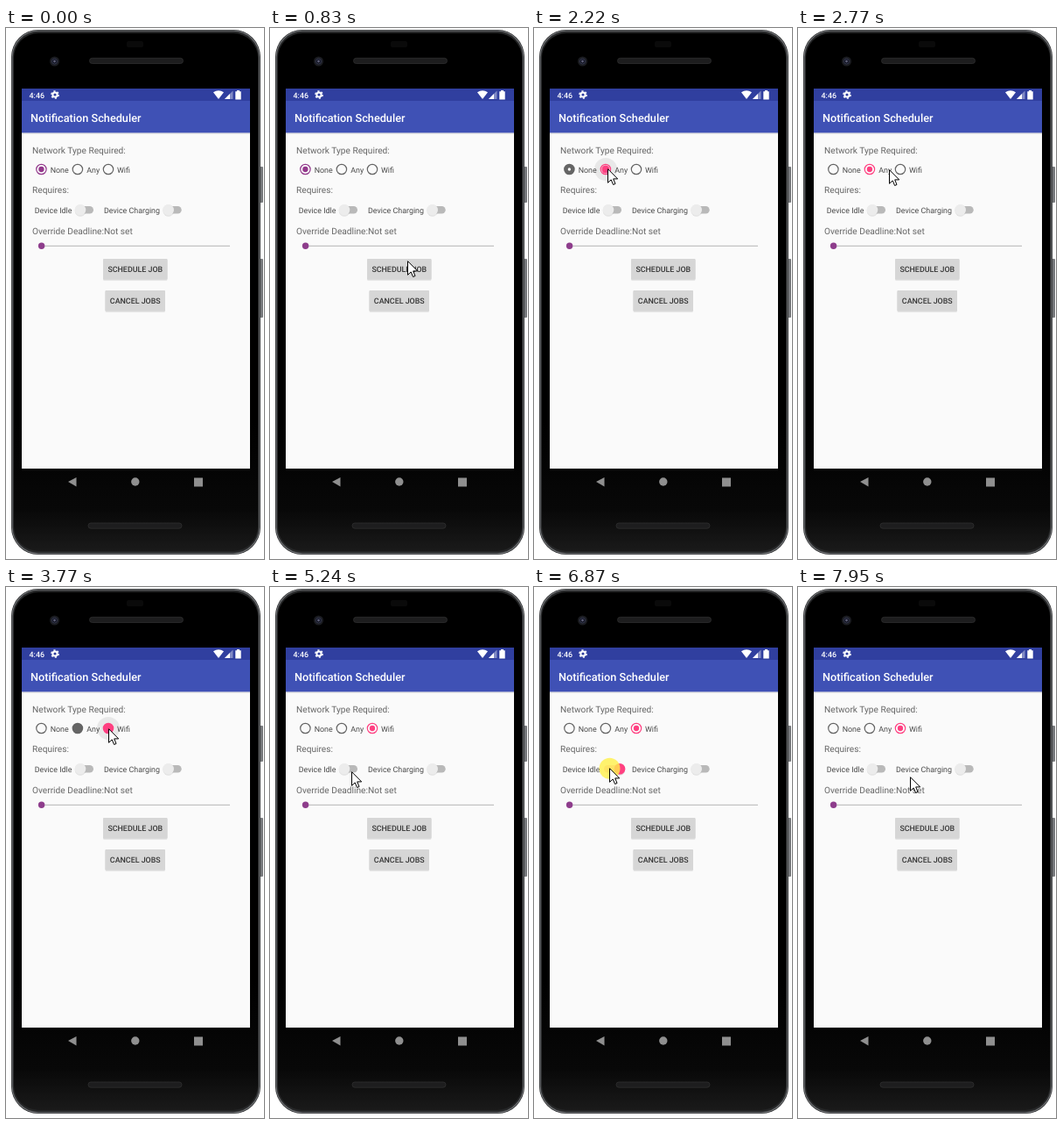
Write an HTML page that moves like this. It is 295 by 605 pixels and loops after 8000 ms.

```html
<!DOCTYPE html>
<html lang="en">
<head>
<meta charset="utf-8">
<title>Notification Scheduler</title>
<style>
  html, body { margin: 0; width: 100%; height: 100%; overflow: hidden; background: #fff; }
  svg { display: block; width: 295px; height: 605px; font: 8.89px Roboto, sans-serif; text-rendering: geometricPrecision; }
  .label { font-size: 10.16px; fill: #666; }
  .small { fill: #4a4a4a; }
  .medium { font-weight: 500; }
</style>
</head>
<body>
<svg viewBox="0 0 295 605">
  <defs>
    <linearGradient id="face" x2="0" y2="1">
      <stop offset=".75" stop-color="#000"/>
      <stop offset=".92" stop-color="#080808"/>
      <stop offset="1" stop-color="#1a1a1a"/>
    </linearGradient>
    <filter id="drop" x="-20%" y="-20%" width="140%" height="150%">
      <feDropShadow dx="0" dy=".6" stdDeviation=".6" flood-opacity=".25"/>
    </filter>
  </defs>

  <!-- phone -->
  <g fill="#77797c">
    <rect x="289" y="158" width="5" height="41" rx="1"/>
    <rect x="289" y="263" width="5" height="67" rx="1"/>
  </g>
  <rect x="6" y="2" width="285" height="598" rx="31" fill="#262728"/>
  <rect x="7.200" y="3.200" width="282.600" height="595.600" rx="30" fill="none" stroke="#6c6e71" stroke-width="1.200"/>
  <rect x="9" y="6" width="279" height="590" rx="28" fill="url(#face)"/>
  <rect x="138" y="15" width="19" height="7" rx="2" fill="#0a0a0a"/>
  <g fill="#1d1d1e" stroke="#333" stroke-width=".7">
    <rect x="95.500" y="34.300" width="107" height="6.200" rx="3"/>
    <rect x="94" y="564" width="107" height="6.200" rx="3"/>
  </g>
  <circle cx="55.500" cy="38" r="5.500" fill="#1b1c21"/>
  <circle cx="55.500" cy="38" r="3" fill="#0c0d18" stroke="#34384f"/>
  <circle cx="55.500" cy="38" r="1.400" fill="#5d5f78"/>

  <!-- screen -->
  <rect x="18" y="69" width="261" height="433" fill="#fafafa"/>
  <rect x="18" y="119" width="261" height="2" fill="#000" opacity=".08"/>
  <rect x="18" y="83" width="261" height="36.400" fill="#3f51b5"/>
  <rect x="18" y="69" width="261" height="14" fill="#303f9f"/>
  <g fill="#fff">
    <text class="medium" x="26.500" y="80">4:46</text>
    <circle cx="56" cy="76" r="2.600" fill="none" stroke="#fff" stroke-width="2"/>
    <circle cx="56" cy="76" r="4.100" fill="none" stroke="#fff" stroke-width="1.500" stroke-dasharray="2.147"/>
    <path d="M237 73.300Q243 69.300 249 73.300L243 81Z"/>
    <path d="M250 81L259.500 71.500V81Z" opacity=".4"/>
    <path d="M250 81L256 75V81Z"/>
    <path d="M262.300 72.300H264V71H267V72.300H268.700V81.500H262.300Z"/>
    <text class="medium" x="28" y="106.500" font-size="12.7">Notification Scheduler</text>
  </g>
  <g fill="#8f8f8f">
    <path d="M71 517L80.500 512V522.500Z"/>
    <circle cx="147.800" cy="517" r="4.700"/>
    <rect x="215" y="512.500" width="10" height="10"/>
  </g>

  <!-- form -->
  <text class="label" x="30" y="143">Network Type Required:</text>
  <text class="label" x="30" y="187.700">Requires:</text>
  <text class="label" x="30" y="234.500">Override Deadline:Not set</text>
  <path d="M41 248.300H256" stroke="#c2c2c2" stroke-width="1.200"/>
  <circle cx="40.600" cy="248.300" r="3.700" fill="#8e3d8c"/>
  <g filter="url(#drop)" fill="#d6d6d6">
    <rect x="111" y="263" width="73.500" height="23.500" rx="1"/>
    <rect x="113.500" y="299" width="68.500" height="23.500" rx="1"/>
  </g>
  <g class="medium" fill="#363636" text-anchor="middle">
    <text x="147.800" y="278.200">SCHEDULE JOB</text>
    <text x="147.800" y="314">CANCEL JOBS</text>
  </g>
  <g class="small">
    <text x="50.700" y="164.500">None</text>
    <text x="92.300" y="164.500">Any</text>
    <text x="127" y="164.500">Wifi</text>
    <text x="32.700" y="210.700">Device Idle</text>
    <text x="112" y="210.700">Device Charging</text>
  </g>

  <circle id="ripple" r="13" fill="#000"/>
  <g id="radios"></g>
  <g id="switches"></g>
  <circle id="halo" r="12" fill="#fff04a"/>
  <path id="cursor" d="M.5 .7V16.300L4.200 12.900L6.600 18.500L9 17.500L6.700 11.900H11.700Z" fill="#fff" stroke="#000" stroke-linejoin="round"/>
</svg>
<script>
const LOOP = 8000, TICK = 77.37, START = 48;
const PINK = '#ff4081', GREY = '#656565', PURPLE = '#93398c';
const RIM = 6.3, HOLE = 5.1, DOT = 3.15;
const $ = id => document.getElementById(id);
const clamp = v => Math.max(0, Math.min(1, v));
const within = (k, a, b) => k >= a && k < b;

function add(parent, tag, attrs) {
  const el = document.createElementNS('http://www.w3.org/2000/svg', tag);
  parent.append(el);
  return set(el, attrs);
}
function set(el, attrs) {
  for (const name in attrs) el.setAttribute(name, attrs[name]);
  return el;
}

// Pointer path: tick, x, y
const path = [
  [2, 256, 625], [3, 253, 598], [5, 238, 510], [8, 188, 330], [11, 142, 232],
  [13, 126, 198], [16, 101, 173], [20, 84, 160], [31, 84, 160], [32, 89, 160],
  [33, 98, 161], [35, 104, 161], [39, 116, 161], [41, 116, 161], [42, 117, 161],
  [61, 117, 165], [63, 111, 185], [65, 99, 211], [66, 96, 213], [67, 93, 210],
  [69, 83, 208], [70, 86, 206], [76, 86, 206], [79, 95, 209], [80, 94, 209],
  [82, 86, 206], [95, 86, 206], [97, 94, 208], [100, 121, 215], [102, 128, 216]
];
function pointer(k) {
  const i = path.findIndex(p => p[0] >= k);
  if (i < 0) return path[path.length - 1].slice(1);
  if (i === 0) return path[0].slice(1);
  const [a, b] = [path[i - 1], path[i]];
  // Rests on a point until the last tick when it barely moves.
  const f = b[0] - a[0] > 15 ? Math.floor((k - a[0]) / (b[0] - a[0])) : (k - a[0]) / (b[0] - a[0]);
  return [1, 2].map(n => Math.round(a[n] + (b[n] - a[n]) * f));
}

function makeRadio(x) {
  const at = { cx: x, cy: 161 };
  const ring = add($('radios'), 'circle', { ...at, fill: 'none' });
  const dot = add($('radios'), 'circle', at);
  // The ring fills inwards, then the disc shrinks to a dot.
  return (v, color) => {
    const hole = v <= .5 ? HOLE * (1 - 2 * v) : HOLE;
    set(ring, { r: (RIM + hole) / 2, 'stroke-width': RIM - hole, stroke: color });
    set(dot, { r: v >= .5 ? HOLE - (2 * v - 1) * (HOLE - DOT) : 0, fill: color });
  };
}

function makeSwitch(x) {
  const track = add($('switches'), 'rect', { x: x - 5, y: 203, width: 20, height: 8.6, rx: 4.3 });
  const thumb = add($('switches'), 'circle', { cy: 207.3, r: 6.3, filter: 'url(#drop)' });
  return (v, on) => {
    set(track, { fill: on ? '#fbb3ca' : '#b9b9b9' });
    set(thumb, { cx: x + 13 * v, fill: on ? PINK : '#ececec' });
  };
}

const [none, any, wifi] = [40.4, 81.9, 117].map(makeRadio);
const [idle, charging] = [85, 185.7].map(makeSwitch);
charging(0, false);

function rippleAt(k, slide) {
  if (within(k, 25, 32)) return [82, 161, 32 - k];
  if (within(k, 46, 53)) return [117, 161, 53 - k];
  if (within(k, 90, 93)) return [85 + 13 * slide, 207, 93 - k];
  return [0, 0, 0];
}

function draw(k) {
  const anyOn = clamp((k - 24) / 6), wifiOn = clamp((k - 45) / 6);
  none(1 - anyOn, anyOn > 0 ? GREY : PURPLE);
  any(anyOn - wifiOn, anyOn > 0 && wifiOn === 0 ? PINK : GREY);
  wifi(wifiOn, wifiOn > 0 ? PINK : GREY);

  const slide = clamp((k - 72) / 3) - clamp((k - 89) / 3);
  idle(slide, within(k, 73, 90));

  const [rx, ry, left] = rippleAt(k, slide);
  set($('ripple'), { cx: rx, cy: ry, opacity: Math.min(.07, left * .018) });

  const [x, y] = pointer(k);
  const pressed = within(k, 23, 25) || within(k, 43, 46) || within(k, 72, 74) || within(k, 88, 90);
  set($('halo'), { cx: x + .5, cy: y + .8, opacity: pressed ? .8 : 0 });
  set($('cursor'), { transform: `translate(${x} ${y})`, opacity: k < 3 ? 0 : 1 });
}

function frame() {
  draw(Math.floor((performance.now() % LOOP - START) / TICK));
  requestAnimationFrame(frame);
}
frame();
</script>
</body>
</html>
```
